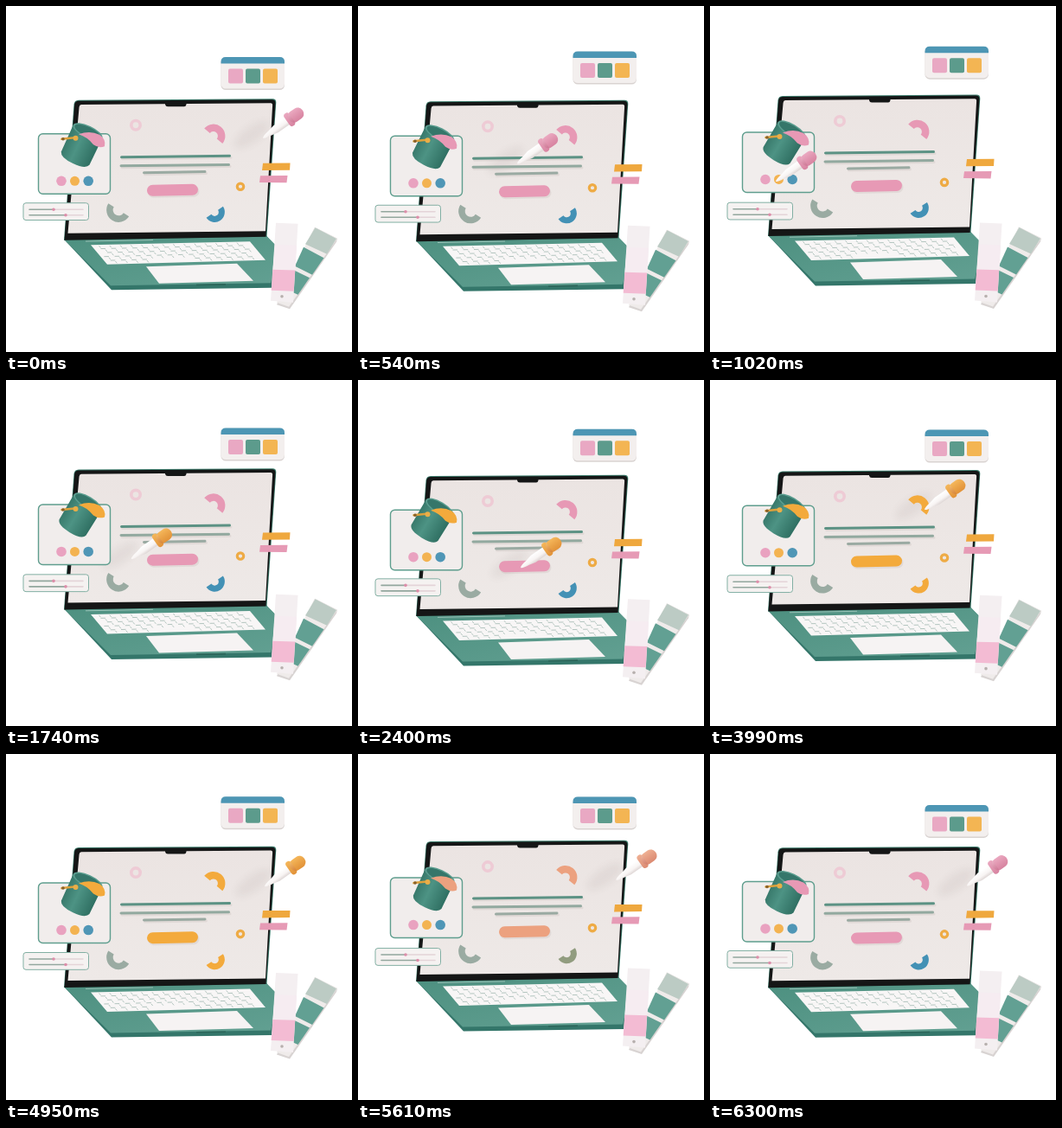
These frames come from a looping animation (400x400 px, 6330 ms). An HTML page:

```html
<!DOCTYPE html>
<html lang="en">
<head>
<meta charset="utf-8">
<title>Design studio</title>
<style>
html, body { margin: 0; width: 100%; height: 100%; overflow: hidden; background: #fff; }
svg { display: block; width: 100vw; height: 100vh; }
.line { fill: none; stroke-linecap: round; }
</style>
</head>
<body>
<svg viewBox="0 0 400 400">
  <defs>
    <linearGradient id="pail" x1="0" x2="1">
      <stop offset="0" stop-color="#38796b"/>
      <stop offset=".4" stop-color="#4d9384"/>
      <stop offset="1" stop-color="#2f6f62"/>
    </linearGradient>
    <linearGradient id="deck" x1="0" y1="0" x2="1" y2="1">
      <stop offset="0" stop-color="#4d9080"/>
      <stop offset="1" stop-color="#62a092"/>
    </linearGradient>
    <linearGradient id="glass" x1="0" y1="0" x2="0" y2="1">
      <stop offset="0" stop-color="#ebe4e2"/>
      <stop offset="1" stop-color="#eee9e7"/>
    </linearGradient>
    <linearGradient id="tube" x1="0" y1="0" x2="0" y2="1">
      <stop offset="0" stop-color="#fff"/>
      <stop offset=".6" stop-color="#f8f4f3"/>
      <stop offset="1" stop-color="#ded6d5"/>
    </linearGradient>
    <linearGradient id="shade" x1="0" y1="0" x2="0" y2="1">
      <stop offset="0" stop-color="#fff" stop-opacity=".16"/>
      <stop offset="1" stop-color="#702" stop-opacity=".14"/>
    </linearGradient>
    <filter id="blur" x="-50%" y="-50%" width="200%" height="200%"><feGaussianBlur stdDeviation="4"/></filter>
    <clipPath id="view"><path d="M85 113 308 111 300 260 71 262Z"/></clipPath>
  </defs>

  <g id="laptop">
    <path d="M67 269 301 265 317 282 307 325 122 327.500Z" fill="#34766a"/>
    <path d="M67 269 301 265 316 280 306 319.500 121 322.500Z" fill="url(#deck)"/>
    <path d="M92 271.300 170 269.800" stroke="#98c0b5" fill="none"/>
    <path d="M220 321.700 254 321.100" stroke="#2b6559" stroke-width="1.600" fill="none"/>
    <path d="M98 275.500 282 271.500 300 293 117 298Z" fill="#f8f6f6"/>
    <path id="keys" fill="none" stroke="#b3c5bf" stroke-width="1"/>
    <path d="M162 300.500 267 297 286 317 177 320Z" fill="#f6f3f3"/>
    <path d="M84 108 308 106.600Q312.500 106.600 312.300 111L301.500 266 67 270 78.500 113Q79 108.200 84 108Z" fill="#3b7b6b"/>
    <path d="M84 109 307 107.600Q311.700 107.600 311.500 112L300.500 266 67.500 270 79.200 113Q80 109.200 84 109Z" fill="#151616"/>
    <path d="M87 113.200 306 111.400Q308.300 111.400 308.100 114L300 259.500 71.500 262 84.600 116Q85 113.300 87 113.200Z" fill="url(#glass)"/>
    <path d="M184 110H208.500V113Q208 115.500 206 115.500H187Q184.500 115.500 184 113Z" fill="#151616"/>
    <g clip-path="url(#view)">
      <ellipse id="shadow" rx="24" ry="9" fill="#756461" opacity=".08" filter="url(#blur)"/>
    </g>
    <g class="line" stroke="#9b8d89" opacity=".14" transform="translate(1 2)">
      <path d="M133.500 174 259 172.500M133 184 258 182.700M159.500 192 230.500 190.800" stroke-width="3"/>
      <path d="M169.500 212.600 216 211.600" stroke-width="13"/>
    </g>
    <g class="line" stroke-width="3">
      <path d="M133.500 174 258.500 172.500" stroke="#5c9284"/>
      <path d="M133 184 257.500 182.700" stroke="#92a99f"/>
      <path d="M159.500 192 230 190.800" stroke="#9aaaa2"/>
    </g>
    <path id="button" class="line" d="M169.500 212.600 215.500 211.600" stroke-width="13"/>
    <circle cx="150" cy="137" r="5.200" fill="none" stroke="#eecbd5" stroke-width="3.600"/>
    <circle cx="271" cy="208" r="3.700" fill="none" stroke="#eeab45" stroke-width="3.200"/>
    <path id="upper" d="M232.500 143.500A9 9 0 1 1 247 155.500" fill="none" stroke-width="8.500"/>
    <path d="M121.500 229.500A9 9 0 0 0 139 240.500" fill="none" stroke="#9aaba2" stroke-width="7.500"/>
    <path id="lower" d="M248 233A7.600 7.600 0 0 1 234.500 242" fill="none" stroke-width="7"/>
    <path d="M297 181 328.500 180.800 328 189 296 189.300Z" fill="#efa83e"/>
    <path d="M294 195.400 325.500 195.200 324.500 203.500 293 203.200Z" fill="#e69ab5"/>
  </g>

  <g id="panel">
    <rect x="37.500" y="147.500" width="83" height="69.500" rx="5" fill="#f1edec" stroke="#5f9e8e" stroke-width="1.400"/>
    <circle cx="64" cy="202" r="5.800" fill="#e9a2c0"/>
    <circle cx="79.500" cy="202" r="5.500" fill="#f3b351"/>
    <circle cx="95.200" cy="202" r="5.800" fill="#4f96b6"/>
    <g id="bucket">
      <path d="M-18.500 0 -18 34Q-16 40.500 0 40.500 16 40.500 18 34L18.500 0Z" fill="url(#pail)"/>
      <ellipse rx="18.500" ry="7" fill="#5a9d8f"/>
      <ellipse rx="16.500" ry="5.500" fill="#35766a"/>
    </g>
    <path id="paint" d="M84 148Q97 143 108 148.500 116 154 114 162 107 164.500 101 160 94 151 84 148Z"/>
    <path class="line" d="M64.500 153.500 79 152" stroke="#dda13c" stroke-width="2.600"/>
    <circle cx="80.500" cy="152.500" r="3" fill="#e9ae48"/>
    <circle cx="66" cy="153.500" r="1.800" fill="#87602a"/>
  </g>

  <g id="slider">
    <rect x="20" y="227.500" width="75.500" height="19.800" rx="3" fill="#f5f2f1" stroke="#82afa3"/>
    <g class="line" stroke-width="1.600">
      <path d="M56 235H89M70 241.500H89" stroke="#e4d4d8"/>
      <path d="M27 235H54M27 241.500H68" stroke="#93a79e"/>
    </g>
    <circle cx="55" cy="235" r="1.800" fill="#dd8eaa"/>
    <circle cx="69" cy="241.500" r="1.800" fill="#dd8eaa"/>
  </g>

  <g id="swatches">
    <path d="M357 256 383 269 382 273 328 350.500 313 345.500Z" fill="#d8d3d2"/>
    <path d="M357 256 383 269 327 348 313 343Z" fill="#efebea"/>
    <path d="M357.500 256.500 382 269.300 371 287 346 275.500Z" fill="#bccbc4"/>
    <path d="M344 279 367.500 291.500 354 311 334 301Z" fill="#62a093"/>
    <path d="M332.500 305.500 351 314.500 337.500 334 320 326Z" fill="#62a093"/>
    <path d="M312 251 337.500 252 332 343 306 341Z" fill="#f4eff1"/>
    <path d="M311 276 336 277 334.300 305.500 308.500 305Z" fill="#f6ecf1"/>
    <path d="M308.300 305 334.200 305.700 332.700 330 306.700 329Z" fill="#f3bbd3"/>
    <circle cx="319" cy="336" r="1.800" fill="#b7b0ae"/>
  </g>

  <g id="palette">
    <rect x="248.500" y="60" width="73.500" height="37" rx="5.500" fill="#d9d3d1"/>
    <rect x="248.500" y="59" width="73.500" height="36.500" rx="5.500" fill="#f3efee"/>
    <path d="M248.500 66.500V64.500Q248.500 59 254 59H316.500Q322 59 322 64.500V66.500Z" fill="#4d96b4"/>
    <rect x="257" y="72.500" width="17" height="17" rx="2" fill="#e9a8c3"/>
    <rect x="277" y="72.500" width="17" height="17" rx="2" fill="#5c9b8c"/>
    <rect x="297" y="72.500" width="17" height="17" rx="2" fill="#f3b553"/>
  </g>

  <g id="dropper">
    <path d="M0 0Q2-2.200 10-3L18-4.800H36V4.800H18L10 3Q2 2.200 0 0Z" fill="url(#tube)"/>
    <g id="bulb">
      <rect x="37" y="-7" width="19" height="14" rx="6.500"/>
      <rect x="34" y="-8.600" width="7" height="17.200" rx="3.400"/>
    </g>
    <rect x="37" y="-7" width="19" height="14" rx="6.500" fill="url(#shade)"/>
    <rect x="34" y="-8.600" width="7" height="17.200" rx="3.400" fill="url(#shade)"/>
  </g>
</svg>
<script>
const LOOP = 6330, BOB = LOOP / 3;
const PINK = [231, 153, 181], ORANGE = [243, 170, 60], BLUE = [67, 145, 181];
const el = id => document.getElementById(id);
const mix = (a, b, k) => a + (b - a) * k;
const clamp = x => Math.max(0, Math.min(1, x));
const ease = x => x * x * (3 - 2 * x);
const ramp = (t, from, to) => ease(clamp((t - from) / (to - from)));
const move = (id, x, y, turn = 0) =>
  el(id).setAttribute('transform', `translate(${x} ${y}) rotate(${turn})`);

// Keyboard gaps, in unit coordinates mapped onto the sloping deck
const deck = (u, v) => [
  mix(mix(98, 282, u), mix(117, 300, u), v).toFixed(1),
  mix(mix(275.5, 271.5, u), mix(298, 293, u), v).toFixed(1)
];
let gaps = '';
const gap = (u1, v1, u2, v2) => gaps += `M${deck(u1, v1)}L${deck(u2, v2)}`;
for (let row = 0; row < 5; row++) {
  for (let key = 1; key < 15; key++) {
    if (row === 4 && key > 4 && key < 9) continue;
    const u = (key + (row % 3) * .3 - .3) / 15;
    gap(u, row / 5 + .05, u, row / 5 + .15);
    if (row) gap(u - .025, row / 5, u + .005, row / 5);
  }
}
el('keys').setAttribute('d', gaps);

// Dropper tip stops: time, x, y
const stops = [
  [0, 297, 152], [150, 297, 152], [920, 76, 207], [1280, 76, 207],
  [2080, 188, 214], [2560, 188, 214], [3080, 212, 243], [3260, 212, 243],
  [3400, 230, 243], [3550, 230, 243], [3900, 248, 152.5], [4080, 248, 152.5],
  [4750, 299, 153], [5100, 299, 153], [LOOP, 297, 152]
];
function tipAt(t) {
  const i = stops.findIndex(s => s[0] > t);
  const [t0, x0, y0] = stops[i - 1], [t1, x1, y1] = stops[i];
  const k = ramp(t, t0, t1);
  return [mix(x0, x1, k), mix(y0, y1, k)];
}

const wave = (t, peak) => Math.cos(2 * Math.PI * (t - peak) / BOB);

function draw(now) {
  const t = now % LOOP;
  const body = -1.9 + 5 * wave(t, 340);
  move('laptop', 0, body);
  move('panel', 0, -.8 + 3.8 * wave(t, 430));
  move('slider', 0, -.2 + 3 * wave(t, 480));
  move('swatches', 0, -.5 + 3.3 * wave(t, 500));
  move('palette', 0, 6.2 * wave(t, 0) - 6.2);

  const reset = ramp(t, 5450, 5750);
  const tint = (id, attr, base, from, to) => {
    const k = ramp(t, from, to) * (1 - reset);
    el(id).setAttribute(attr, `rgb(${base.map((c, i) => Math.round(mix(c, ORANGE[i], k)))})`);
  };
  tint('bulb', 'fill', PINK, 1100, 1300);
  tint('paint', 'fill', PINK, 1100, 1300);
  tint('button', 'stroke', PINK, 2420, 2620);
  tint('lower', 'stroke', BLUE, 3400, 3560);
  tint('upper', 'stroke', PINK, 3820, 3970);

  const tilt = ramp(t, 300, 900) - ramp(t, 4200, 4900);
  move('bucket', 94.5, 145, 25 + 6 * tilt);

  const [x, y] = tipAt(t);
  move('dropper', x, y + body, -35);
  move('shadow', x - 13, y - 4, -35);
}

function frame(now) {
  draw(now);
  requestAnimationFrame(frame);
}
draw(0);
requestAnimationFrame(frame);
</script>
</body>
</html>
```
